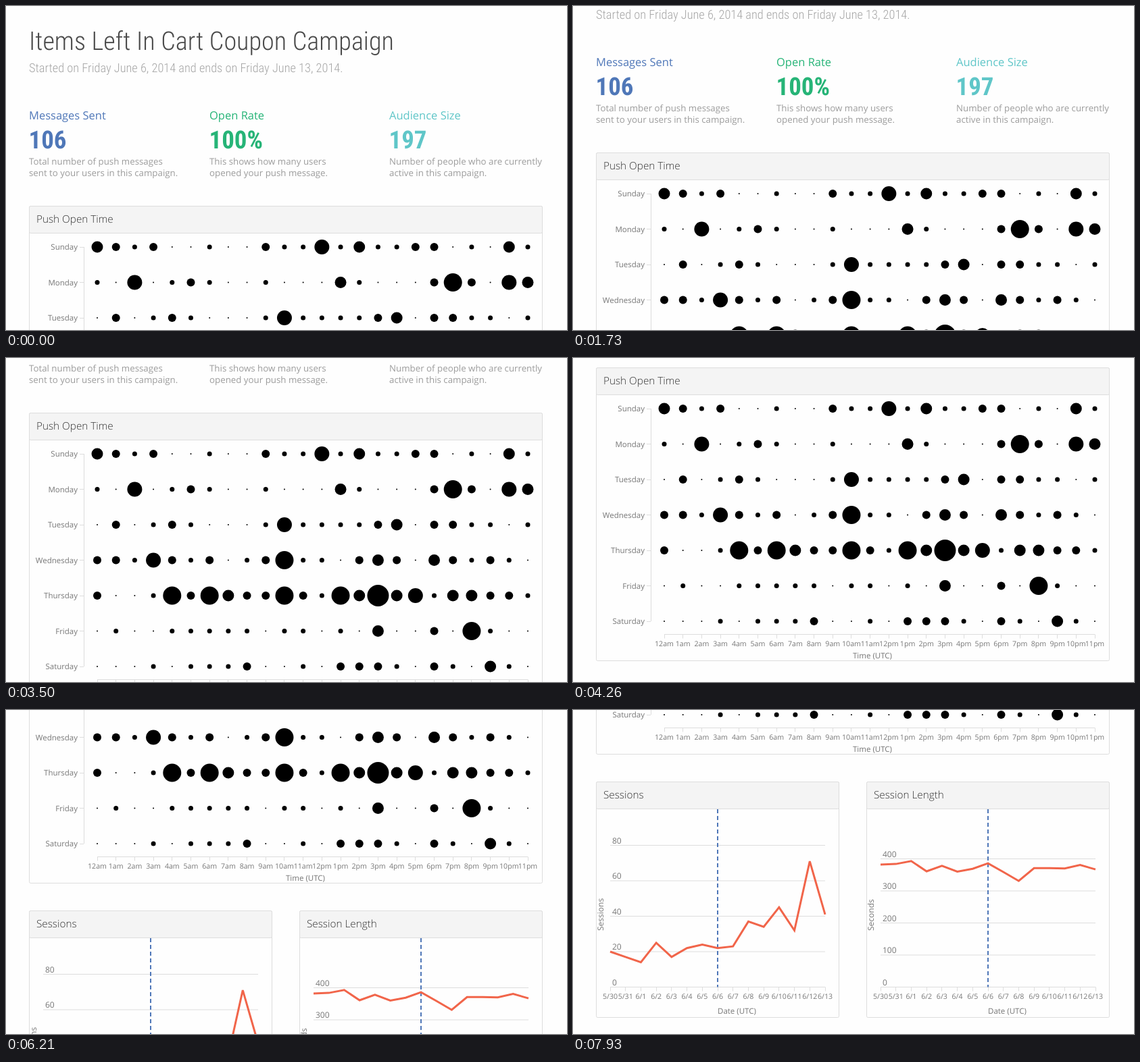
Animation, 830 px wide and 480 px high, one loop 7.99 s. Source, as an HTML page:

```html
<!DOCTYPE html>
<html lang="en">
<head>
<meta charset="utf-8">
<title>Campaign report</title>
<style>
html, body { margin: 0; width: 100%; height: 100%; overflow: hidden; background: #fefefe; }
svg { display: block; width: 830px; height: 480px; font-family: "Open Sans", "Noto Sans", sans-serif; text-rendering: geometricPrecision; }
.cond { font-family: "Roboto Condensed", "Open Sans Condensed", Roboto, sans-serif; font-stretch: 75%; }
.title { font-size: 40px; font-weight: 300; fill: #4a4a4a; }
.sub { font-size: 20px; font-weight: 300; fill: #a6a6a6; }
.name { font-size: 16.5px; }
.num { font-size: 40px; font-weight: 600; }
.desc { font-size: 13.3px; fill: #9c9c9c; }
.head { font-size: 15.3px; font-weight: 300; fill: #333; }
.label { font-size: 11.5px; fill: #777; }
.tick { font-size: 10.6px; fill: #777; }
.value { font-size: 12px; fill: #777; }
.end { text-anchor: end; }
.mid { text-anchor: middle; }
.line { fill: none; stroke: #ddd; }
.data { fill: none; stroke: #f1654a; stroke-width: 3; }
.mark { fill: none; stroke: #4f77b8; stroke-width: 2; stroke-dasharray: 6 4; }
</style>
</head>
<body>
<svg viewBox="0 0 830 480"><g id="page"></g></svg>
<script>
const page = document.getElementById('page');
const text = (x, y, s, cls, attr = '') => `<text x="${x}" y="${y}" class="${cls}" ${attr}>${s}</text>`;
const path = (d, cls = 'line') => `<path d="${d}" class="${cls}"/>`;

const panel = (x, y, w, h, name) =>
  `<rect x="${x}" y="${y}" width="${w}" height="${h}" rx="2" fill="#fefefe" stroke="#ddd"/>` +
  `<rect x="${x}" y="${y}" width="${w}" height="40" rx="2" fill="#f4f4f4" stroke="#ddd"/>` +
  text(x + 10.5, y + 24.5, name, 'head');

const metric = (x, color, name, num, a, b) =>
  text(x, 168, name, 'name', `fill="${color}"`) +
  text(x - 0.5, 211, num, 'num cond', `fill="${color}"`) +
  text(x, 235, a, 'desc') + text(x, 252, b, 'desc');

// Punch card: each digit is a dot size, one column per hour
const week = {
  Sunday: '321200100211413112201031',
  Monday: '104012100100031000252043',
  Tuesday: '020121000141111230221101',
  Wednesday: '221421201251102320321210',
  Thursday: '200152532252153634133221',
  Friday: '010011111011010300205100',
  Saturday: '000101112001022210210310'
};

function punchCard() {
  const colX = c => 135 + c * 637 / 23;
  let out = panel(34.5, 296.5, 759, 434, 'Push Open Time') +
    path('M115.5 357V672M135 691.5H772');
  Object.entries(week).forEach(([day, sizes], r) => {
    const y = 357 + r * 52.5;
    out += text(106, y + 4, day, 'label end') + path(`M109 ${Math.floor(y) + 0.5}H115`);
    [...sizes].forEach((k, c) => {
      out += `<circle cx="${colX(c)}" cy="${y}" r="${1 + 2.5 * k}"/>`;
    });
  });
  for (let c = 0; c < 24; c++) {
    out += path(`M${Math.floor(colX(c)) + 0.5} 691.5v6`) +
      text(colX(c), 709, (c % 12 || 12) + (c < 12 ? 'am' : 'pm'), 'tick mid');
  }
  return out + text(414, 727, 'Time (UTC)', 'label');
}

function lineChart(x, name, unit, step, gap, count, data) {
  const base = 1075.5, left = x + 20.5;
  const px = i => left + i * 318 / 14;
  const py = v => base - v * gap / step;
  let out = panel(x, 771.5, 359, 349, name);
  for (let i = 0; i <= count; i++) {
    const y = base - i * gap;
    out += path(`M${left} ${y}h318`) + text(left + 3, y - 3, i * step, 'value');
  }
  data.forEach((v, i) => {
    const date = i < 2 ? `5/${30 + i}` : `6/${i - 1}`;
    out += path(`M${Math.floor(px(i)) + 0.5} ${base}v6`) + text(px(i), 1093, date, 'tick mid');
  });
  return out +
    path(`M${px(7)} 812V${base}`, 'mark') +
    path('M' + data.map((v, i) => `${px(i)} ${py(v)}`).join('L'), 'data') +
    text(left + 159, 1115, 'Date (UTC)', 'label') +
    text(0, 0, unit, 'value', `transform="translate(${x + 10.5} 992) rotate(-90)"`);
}

page.innerHTML =
  text(34, 65, 'Items Left In Cart Coupon Campaign', 'title cond') +
  text(34, 98, 'Started on Friday June 6, 2014 and ends on Friday June 13, 2014.', 'sub cond') +
  metric(34, '#4f77b8', 'Messages Sent', '106', 'Total number of push messages', 'sent to your users in this campaign.') +
  metric(301, '#26b477', 'Open Rate', '100%', 'This shows how many users', 'opened your push message.') +
  metric(567, '#5fc6c8', 'Audience Size', '197', 'Number of people who are currently', 'active in this campaign.') +
  punchCard() +
  lineChart(34.5, 'Sessions', 'Sessions', 20, 52.5, 4,
    [20, 17, 14, 25, 17, 22, 24, 22, 23, 37, 34, 45, 32, 71, 41]) +
  lineChart(434.5, 'Session Length', 'Seconds', 100, 47.5, 4,
    [382, 384, 393, 361, 378, 360, 369, 386, 359, 331, 371, 371, 370, 381, 367]);

// Pick the font size of a condensed style from its measured length
function fit(cls, width) {
  const all = [...page.querySelectorAll('.' + cls)];
  const size = parseFloat(getComputedStyle(all[0]).fontSize) * width / all[0].getComputedTextLength();
  all.forEach(el => { el.style.fontSize = size + 'px'; });
}
fit('title', 540);
fit('sub', 465);
fit('num', 56);

// Scrolling: bursts of [start ms, end ms, steps], and [step, offset] knots
const LOOP = 7990;
const bursts = [
  [500, 1260, 13], [1320, 2070, 14], [2130, 2880, 14], [2930, 3670, 14], [3730, 4480, 14],
  [4540, 5300, 14], [5350, 6090, 13], [6150, 6910, 14], [6970, 7750, 14], [7810, 7930, 3]
];
const knots = [[0, 0], [21, 79], [38, 148], [65, 282], [80, 371], [98, 474], [127, 665]];

const stepAt = t => bursts.reduce((n, [a, b, c]) =>
  t < a ? n : n + Math.min(c, 1 + Math.floor((t - a) / (b - a) * (c - 1) + 0.15)), 0);

function slope(i) {
  const a = knots[Math.max(i - 1, 0)], b = knots[Math.min(i + 1, knots.length - 1)];
  return (b[1] - a[1]) / (b[0] - a[0]);
}

function offset(n) {
  let i = 0;
  while (i < knots.length - 2 && n > knots[i + 1][0]) i++;
  const [n0, y0] = knots[i], [n1, y1] = knots[i + 1];
  const d = n1 - n0, u = (n - n0) / d, v = 1 - u;
  return v * v * (1 + 2 * u) * y0 + u * u * (3 - 2 * u) * y1 +
    d * u * v * (v * slope(i) - u * slope(i + 1));
}

function draw() {
  const t = performance.now() % LOOP;
  page.setAttribute('transform', `translate(0 ${-Math.round(offset(stepAt(t)))})`);
  requestAnimationFrame(draw);
}
draw();
</script>
</body>
</html>
```
